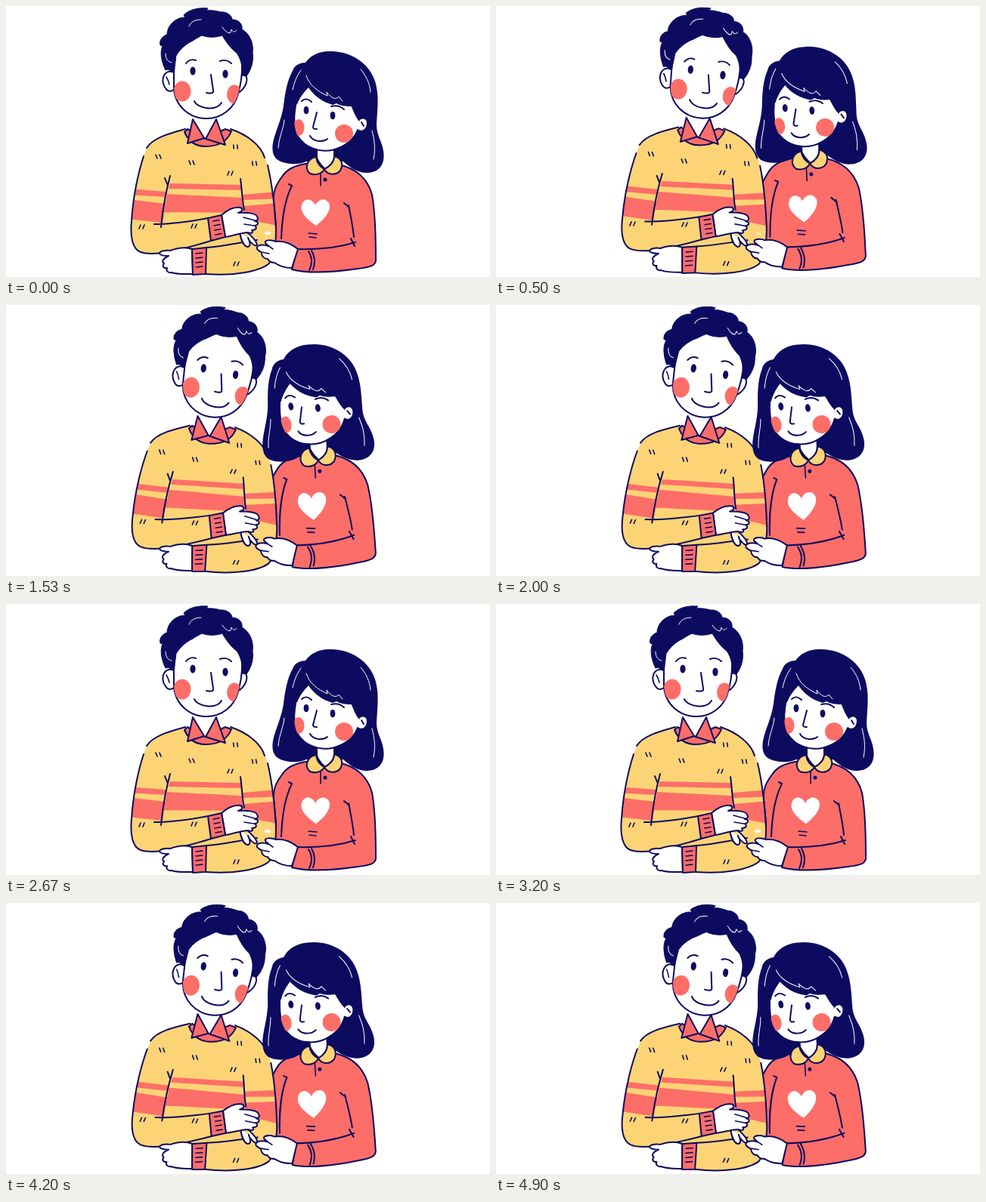
These frames come from a looping animation (640x359 px, 5000 ms). An HTML page:

```html
<!DOCTYPE html>
<html lang="en">
<head>
<meta charset="utf-8">
<title>Couple</title>
<style>
  html, body { margin: 0; width: 100%; height: 100%; overflow: hidden; background: #fff; }
  svg { display: block; width: 100%; height: 100%; }
  path { fill: none; stroke: #0d0b60; stroke-width: 2; stroke-linecap: round; stroke-linejoin: round; }
  .white { fill: #fff; }
  .red { fill: #fd6e68; }
  .yellow { fill: #fdd475; }
  .navy { fill: #0d0b60; }
  .bare { stroke: none; }
  .strand { stroke: #fff; stroke-width: 1; }
  .thin { stroke-width: 1.6; }
</style>
</head>
<body>
<svg viewBox="0 0 640 359">
  <clipPath id="sweater"><use href="#torso"/></clipPath>
  <clipPath id="manSkin"><use href="#manFace"/></clipPath>
  <clipPath id="girlSkin"><use href="#girlFace"/></clipPath>

  <g class="girl-body">
    <path class="red" d="M402,208 C380,211 371,217 365,226 C357,237 353,245 354,258 L357,290 L354,312 L385,322 L378,349 C400,355 438,352 465,348 C482,346 490,344 489,335 C489,300 488,272 484,250 C478,228 462,215 440,210Z"/>
    <path d="M374,236 L378,238 C371,252 365,277 364,308 M447,261 L454,267 M453,264 C456,279 459,295 460,306 M386,322 C420,323 443,319 462,313 M456,308 L461,318 M400,325 C405,333 405,342 401,350 M404,324 C409,333 409,341 406,349"/>
    <path class="white bare" d="M410,291 C400,284 388,274 391,264 C393,254 405,254 409,264 C413,254 426,254 428,264 C429,274 419,284 410,291Z"/>
    <path class="thin" d="M400,301 L411,302 M401,306 L410,307 M416,222 L416,238"/>
    <circle class="navy" cx="422" cy="230" r="2.5"/>
  </g>

  <g class="man-body">
    <path id="torso" class="yellow bare" d="M237,163 C215,169 190,176 183,196 C176,215 168,250 166,285 C164,305 167,322 178,326 C186,329 198,328 207,327 L246,355 L264,355 C300,358 335,352 348,341 C356,330 357,310 357,296 C355,262 350,225 344,204 C340,186 320,170 297,163Z"/>
    <path class="red bare" clip-path="url(#sweater)" d="M160,242 L213,246 L211,253 L160,250Z M160,256 L211,262 L207,287 L160,282Z M217,235 L311,237 L311,244 L215,242Z M213,249 L312,254 L314,274 L209,273Z M313,250 L360,246 L360,255 L313,257Z M314,265 L360,261 L360,291 L329,285 L326,275 L315,274Z"/>
    <path d="M237,163 C215,169 194,175 186,188 M182,199 C176,217 168,250 166,285 C164,305 167,322 178,326 C186,329 198,328 207,327 M264,355 C300,358 335,352 348,341 C356,330 357,310 357,296 C355,262 351,232 346,211 M342,201 C337,184 318,170 297,163"/>
    <path d="M210,228 L214,238 M217,225 C211,248 207,270 205,293 M310,229 C312,242 312,256 315,270 M196,289 C220,289 245,285 267,281 M207,327 C235,322 255,316 271,311 M265,320 C290,318 310,313 332,310"/>
    <path id="ticks" class="thin"/>
    <ellipse id="glint" fill="#fff" cx="346" cy="301" rx="4" ry="2.3"/>

    <path class="white" d="M309,300 C311,311 315,318 319,319 C324,319 323,313 320,307 M319,300 C325,305 331,311 332,316 C330,319 326,316 322,311"/>
    <path class="white" d="M285,277 C294,269 302,266 310,267 C314,269 313,272 307,274 C320,273 331,275 332,279 C334,282 333,284 329,285 C335,286 334,290 329,291 C333,294 330,297 325,297 C328,300 325,302 319,300 C308,301 298,305 290,306Z"/>
    <path class="thin" d="M314,280 L329,284 M315,289 L328,291"/>
    <path class="white" d="M246,322 C235,318 225,321 217,324 C210,323 203,325 203,328 C204,331 211,331 215,331 C208,334 205,339 209,341 C206,345 209,348 213,347 C211,351 215,354 219,353 C228,356 240,355 247,355Z"/>
    <path class="red" d="M267,281 L285,277 L290,306 L271,311Z M246,322 L265,320 L264,355 L247,356Z"/>
    <path id="ribs" class="thin"/>

    <path class="white bare" d="M248,140 L278,140 L281,160 L264,178 L247,158Z"/>
    <path class="red" d="M240,163 L236,167 C242,181 252,186 264,186 C280,186 292,181 298,166 L290,163 L264,176Z"/>
    <path class="red" d="M247,150 L240,182 L262,175Z M278,150 L264,176 L290,184Z"/>
  </g>

  <g class="man-head">
    <path class="white" d="M222,88 C209,82 203,99 211,109 C214,114 219,114 223,110 M312,92 C321,89 321,104 309,114"/>
    <path class="thin" d="M212,94 C214,97 215,100 216,104"/>
    <path id="manFace" class="white" d="M222,62 L222,108 C223,134 244,149 265,149 C285,149 302,136 307,116 C311,102 313,90 312,72 L290,36 L250,38Z"/>
    <g class="red" clip-path="url(#manSkin)">
      <ellipse cx="233" cy="113" rx="11.5" ry="13.5"/>
      <ellipse cx="302" cy="117" rx="10" ry="12.5"/>
    </g>
    <path class="navy" d="M222,88 L214,84 L211,85 C206,75 203,62 207,53 L204,52 C202,45 208,39 213,38 C213,26 224,15 237,15 L235,12 C243,4 255,2 267,3 L265,6 C272,5 280,7 284,8 C292,7 299,13 299,18 C308,18 313,24 312,31 C322,36 328,50 326,62 C328,75 323,86 318,93 L312,91 C313,81 311,72 306,63 C298,57 291,48 286,39 C276,42 268,42 259,39 C255,41 250,44 247,46 C238,50 229,58 225,66Z" style="stroke-width:1"/>
    <path class="strand" d="M242,27 C244,21 250,18 258,18 M286,28 C290,34 295,37 297,35 L298,31 C300,35 303,35 305,32 M211,63 C211,70 214,74 219,75"/>
    <path d="M238,76 C241,72 246,70 251,72 M283,73 C288,71 294,72 298,76 M271,91 L274,112 C275,116 270,116 265,115 M249,126 C253,136 278,140 285,128"/>
    <ellipse class="navy" cx="247" cy="86" rx="3.6" ry="5.6"/>
    <ellipse class="navy" cx="290" cy="90" rx="3.6" ry="5.6"/>
  </g>

  <g class="girl-head">
    <path class="navy bare" d="M430,60 C414,59 402,66 396,75 C388,75 381,79 379,86 C372,98 369,115 367,132 C365,146 360,158 356,170 C352,182 350,194 357,202 C364,209 384,212 397,206 L446,206 C455,214 465,221 477,221 C493,221 502,210 499,192 C497,178 490,172 490,157 C491,139 493,122 490,108 C486,80 459,60 430,60Z"/>
  </g>

  <g class="girl-body">
    <path class="white" d="M411,184 L411,201 C414,209 419,213 422,216 C428,212 433,208 434,201 L434,184Z"/>
    <path class="yellow" d="M410,200 C398,202 394,215 402,222 C410,225 418,222 421,216 C425,224 436,225 442,218 C447,209 443,201 434,199 C434,207 428,213 421,216 C415,213 411,207 410,200Z"/>
  </g>

  <g class="girl-head">
    <path id="girlFace" class="white" d="M386,118 C379,145 379,166 390,178 C402,192 425,195 440,188 C454,182 461,174 465,164 C470,168 475,165 477,160 C480,151 475,146 467,150 L455,128 L398,106Z"/>
    <g class="red" clip-path="url(#girlSkin)">
      <ellipse cx="387" cy="161" rx="7.5" ry="11"/>
      <circle cx="447" cy="169" r="12"/>
    </g>
    <path class="navy bare" d="M378,130 L390,98 L430,85 L470,110 L480,147 C472,145 469,148 467,153 C462,147 459,139 457,133 C449,133 442,132 437,129 L432,131 C419,127 408,120 400,108 C395,113 389,120 385,130Z"/>
    <path class="strand" d="M397,92 C401,105 412,113 425,119 L424,114 C430,122 436,125 440,120 L445,126 M390,85 C384,93 381,102 379,111 M368,151 C367,163 361,173 360,188 M469,84 C476,92 481,102 482,114 M484,165 C487,177 489,188 486,203"/>
    <path d="M391,126 C395,122 400,123 404,127 M430,133 C437,131 443,133 447,137 M411,141 L406,160 C406,163 408,163 411,163 M402,172 C406,180 419,181 425,176 M470,154 L473,159"/>
    <ellipse class="navy" cx="397" cy="138" rx="3.4" ry="5.2"/>
    <ellipse class="navy" cx="432" cy="145" rx="3.4" ry="5.2"/>
  </g>

  <g class="girl-body">
    <path class="white" d="M386,322 C376,314 366,311 357,312 C350,309 341,310 343,314 L347,318 C338,315 330,317 332,322 C334,325 337,325 338,327 C338,332 342,335 346,335 C348,339 352,340 355,340 C362,345 370,347 378,347Z"/>
    <path class="thin" d="M346,317 L353,322 M338,326 L348,328"/>
  </g>
</svg>
<script>
const LOOP = 5000, STEP = LOOP / 62;
// Leaning moves: start, end, lean before, lean after
const MOVES = [[130, 670, 0, 1], [2000, 2560, 1, 0], [3440, 3980, 0, 1]];

const byId = id => document.getElementById(id);
const place = (name, value) =>
  document.querySelectorAll('.' + name).forEach(g => g.setAttribute('transform', value));

// x, y and slant of each pair of stitches
const stitches = [[201, 200, -1], [245, 208, -1], [303, 187, -0.3], [296, 222, 1],
  [328, 209, -0.5], [179, 293, 1], [248, 292, 1], [304, 342, 1]];
byId('ticks').setAttribute('d', stitches.map(([x, y, slant]) =>
  [-2, 3].map(dx => `M${x + dx + slant},${y - 3} l${-2 * slant},5`).join('')).join(''));

const ribs = [0, 1, 2, 3].map(i =>
  `M${274 + i},${285 + i * 6} l8,-1.5 M251,${328 + i * 6} l9,-1`);
byId('ribs').setAttribute('d', ribs.join(''));

function leanAt(time) {
  let lean = 0;
  for (const [start, end, from, to] of MOVES) {
    if (time < start) break;
    const p = Math.min(1, (time - start) / (end - start));
    lean = from + (to - from) * p * p * (3 - 2 * p);
  }
  return lean;
}

function draw() {
  const time = performance.now() % LOOP;
  const k = leanAt(Math.floor(time / STEP) * STEP);
  place('man-head', `translate(0 ${-k}) rotate(${6.2 * k} 265 217)`);
  place('man-body', `matrix(1 ${0.04 * k} ${-0.036 * k} 1 ${11.9 * k} ${-12.8 * k})`);
  place('girl-head', `translate(0 ${-8 * k}) rotate(${-8 * k} 418 285)`);
  place('girl-body', `matrix(1 ${-0.055 * k} ${0.065 * k} ${1 + 0.045 * k} ${-22.1 * k} ${3.1 * k})`);
  byId('glint').setAttribute('opacity', 1 - k);
  requestAnimationFrame(draw);
}
draw();
</script>
</body>
</html>
```
